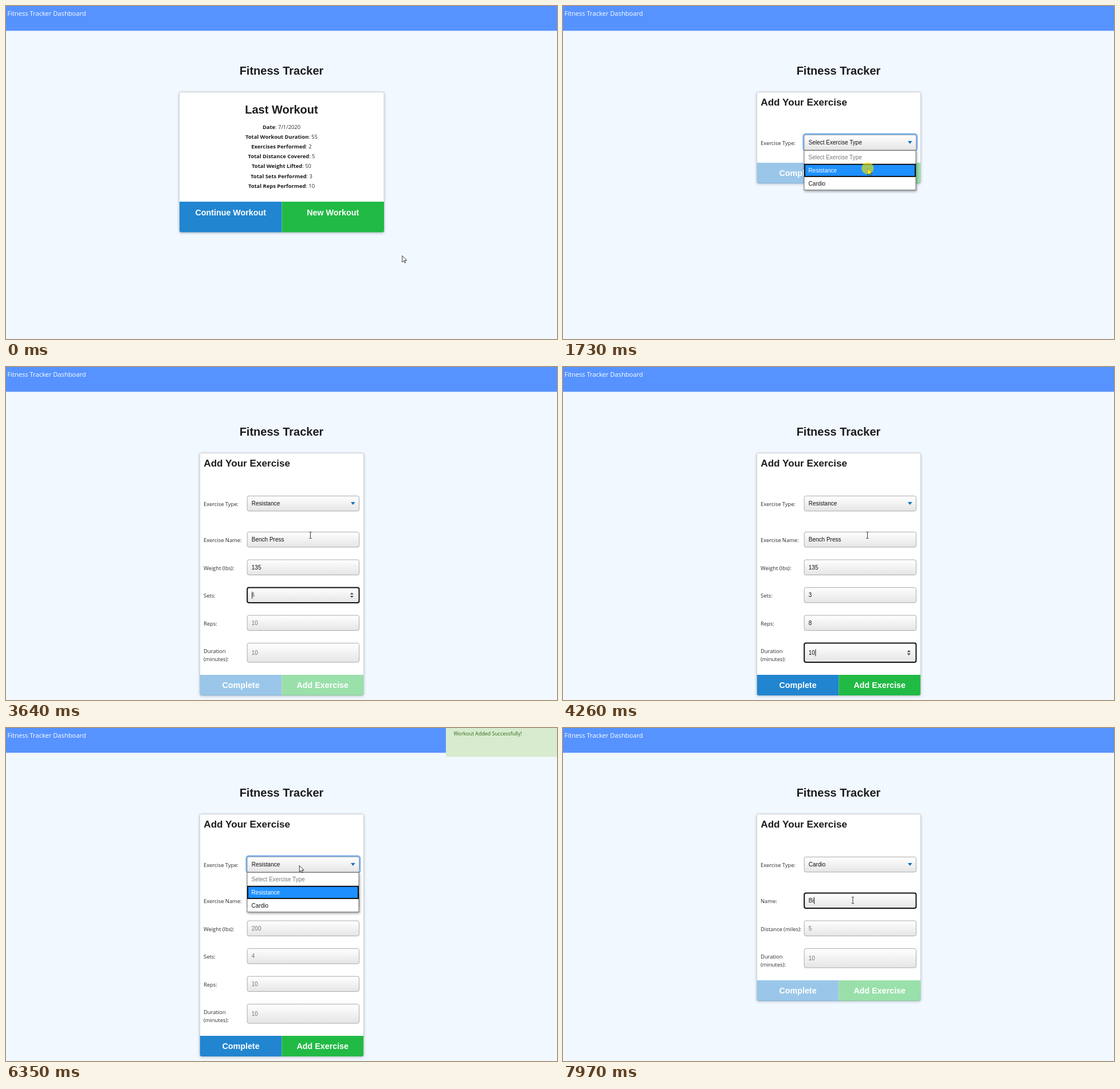
An HTML page for the animation above (8000 ms loop, 962 by 582 pixels).

```html
<!DOCTYPE html>
<html lang="en">
<head>
<meta charset="utf-8">
<title>Fitness Tracker</title>
<style>
  html, body { margin: 0; width: 100%; height: 100%; overflow: hidden; background: #f1f8ff; }
  svg { position: absolute; left: 0; top: 0; }
  text { font-family: "Open Sans", "Noto Sans", sans-serif; font-size: 9.4px; fill: #2b2b2b; }
  .b { font-weight: 700; fill: #1b1c1d; }
  .h { font-family: "Liberation Sans", Arial, sans-serif; font-weight: 700; fill: #1b1c1d; }
  .i { font-family: "Liberation Sans", Arial, sans-serif; font-size: 10px; fill: #111; }
  .ph { fill: #777; }
  .card { fill: #fff; stroke: #d0d2d6; filter: drop-shadow(0 1px 2px rgba(40, 50, 70, .3)); }
  .list { fill: #fff; stroke: #767676; filter: drop-shadow(1px 2px 2px rgba(0, 0, 0, .4)); }
</style>
</head>
<body>
<svg id="stage" width="962" height="582" viewBox="0 0 962 582">
  <defs>
    <linearGradient id="grad" x1="0" y1="0" x2="0" y2="1">
      <stop offset="0" stop-color="#fff"/><stop offset="1" stop-color="#e5e5e5"/>
    </linearGradient>
  </defs>
  <rect width="962" height="582" fill="#f1f8ff"/>
  <rect width="962" height="43.3" fill="#5793ff"/>
  <text x="2.4" y="16.5" style="font-size:11.15px;fill:#fff">Fitness Tracker Dashboard</text>
  <text class="h" x="481" y="120" text-anchor="middle" style="font-size:20px">Fitness Tracker</text>
  <g id="page"></g>
  <g id="toast">
    <rect width="214" height="50.3" fill="#d7ebce"/>
    <text x="13.6" y="13" style="font-size:8.9px;fill:#33691e">Workout Added Successfully!</text>
  </g>
  <g id="pointer"></g>
</svg>
<script>
const LOOP = 8000;
const BLUE = '#2185d0', GREEN = '#21ba45', GREEN_ON = '#0ea432';
const OPTIONS = ['Select Exercise Type', 'Resistance', 'Cardio'];
const $ = id => document.getElementById(id);
const pen = document.createElement('canvas').getContext('2d');
pen.font = '10px "Liberation Sans", Arial, sans-serif';

// [time, x, y] of the pointer
const PATH = [
  [70, 691.5, 436], [530, 530, 357], [850, 530, 357], [1260, 532, 241], [1420, 532, 241],
  [1650, 531.5, 283.5], [1830, 531.5, 283.5], [2080, 531.5, 294], [4260, 531.5, 294],
  [4790, 533, 552], [5030, 533, 552], [5660, 519, 219], [5750, 519, 219], [6080, 512, 240],
  [6440, 512, 240], [6750, 508, 304.5], [7080, 508, 304.5], [7400, 506, 301]
];
const CLICKS = [[690, 850], [1320, 1430], [1650, 1810], [2120, 2220], [4870, 5020],
  [6180, 6290], [6890, 7000], [7570, 7680]];
const FOCUS = [[0, ''], [1340, 'type'], [2150, 'name'], [3180, 'weight'], [3570, 'sets'],
  [3800, 'reps'], [4030, 'time'], [4870, 'add'], [6200, 'type'], [7600, 'name']];
const KIND = [[0, 0], [1800, 1], [6970, 2]];
const CLEARED = 5180;

const FORMS = [
  [],
  [['name', 'Exercise Name:', 'Bench Press'], ['weight', 'Weight (lbs):', '200'],
   ['sets', 'Sets:', '4'], ['reps', 'Reps:', '10'], ['time', 'Duration', '10']],
  [['name', 'Name:', 'Running'], ['miles', 'Distance (miles):', '5'], ['time', 'Duration', '10']]
];
// field: [first key time, text]
const TYPED = {
  name: [2305, 'Bench Press'], weight: [3255, '135'], sets: [3645, '3'],
  reps: [3875, '8'], time: [4105, '10']
};

const within = (t, a, b) => t >= a && t < b;
const latest = (rows, t) => rows.filter(r => r[0] <= t).pop()[1];
const ease = u => u * u * (3 - 2 * u);
const ramp = (t, a, b) => ease(Math.min(1, Math.max(0, (t - a) / (b - a))));
const keys = (t, [start, text]) => t < start ? '' : text.slice(0, Math.floor((t - start) / 78) + 1);
const isOpen = t => within(t, 1390, 1800) || within(t, 6270, 6970);

const text = (x, y, s, cls = '', extra = '') => `<text class="${cls}" x="${x}" y="${y}" ${extra}>${s}</text>`;
const rect = (x, y, w, h, extra) => `<rect x="${x}" y="${y}" width="${w}" height="${h}" ${extra}/>`;
const title = (x, y, s, size, extra = '') => text(x, y, s, 'h', `style="font-size:${size}px;${extra}"`);

function place(t) {
  const n = PATH.findIndex(p => p[0] > t);
  if (n === 0) return PATH[0].slice(1);
  if (n < 0) return PATH[PATH.length - 1].slice(1);
  const [a, x, y] = PATH[n - 1], [b, x2, y2] = PATH[n];
  const u = ramp(t, a, b);
  return [x + (x2 - x) * u, y + (y2 - y) * u];
}

function buttons(x, y, w, h, base, names, green, alpha) {
  const half = w / 2, r = 3;
  const label = (cx, s) => text(cx, base, s, 'h', 'text-anchor="middle" style="font-size:14.29px;fill:#fff"');
  return `<g opacity="${alpha}">
    <path d="M${x} ${y}h${half}v${h}h${r - half}q${-r} 0 ${-r} ${-r}z" fill="${BLUE}"/>
    <path d="M${x + half} ${y}h${half}v${h - r}q0 ${r} ${-r} ${r}h${r - half}z" fill="${green}"/></g>`
    + label(x + half / 2, names[0]) + label(x + half * 1.5, names[1]);
}

function summary(t) {
  const rows = [['Date', '7/1/2020'], ['Total Workout Duration', 55], ['Exercises Performed', 2],
    ['Total Distance Covered', 5], ['Total Weight Lifted', 50], ['Total Sets Performed', 3],
    ['Total Reps Performed', 10]];
  return rect(302.5, 150.5, 357.5, 245, 'rx="3" class="card"')
    + text(481, 188, 'Last Workout', 'h', 'text-anchor="middle" style="font-size:20px"')
    + rows.map(([k, v], i) => text(481, 214.8 + 17.15 * i,
        `<tspan class="b">${k}</tspan>: ${v}`, '', 'text-anchor="middle"')).join('')
    + buttons(303, 342, 357, 53.5, 365.7, ['Continue Workout', 'New Workout'],
        t < 690 ? GREEN : GREEN_ON, 1);
}

function box(y, h, focused) {
  const line = focused ? 'stroke="#111" stroke-width="2"' : 'stroke="#aaa"';
  return rect(421.2, y, 195.3, h, `rx="3" fill="url(#grad)" ${line}`);
}

function field(t, kind, [id, label, hint], y, focus) {
  const tall = id === 'time', h = tall ? 33.5 : 26.5, base = y + h / 2 + 3.5;
  let value = '';
  if (kind === 1 && t < CLEARED && TYPED[id]) value = keys(t, TYPED[id]);
  if (kind === 2 && id === 'name') value = keys(t, [7885, 'Bi']);
  const on = focus === id;
  let out = text(345, y + 17.6, label) + box(y, h, on);
  if (tall) out += text(345, y + 31.2, '(minutes):');
  out += text(428.8, base, value || hint, value ? 'i' : 'i ph');
  if (on) {
    const x = 429.3 + pen.measureText(value).width, m = y + h / 2;
    out += rect(x, m - 6, 1, 12, 'fill="#111"');
    if (id !== 'name') out += `<path d="M600.8 ${m - 1.2}l3-3.4 3 3.4zm0 2.4l3 3.4 3-3.4z" fill="#444"/>`;
  }
  return out;
}

function dropdown(kind, my) {
  let hot = Math.floor((my - 253) / 22.8);
  if (hot < 0 || hot > 2) hot = kind;
  return rect(421, 252.5, 195, 69, 'class="list"') + OPTIONS.map((s, i) => {
    const y = 253 + 22.8 * i;
    const mark = i === hot ? rect(422, y + .9, 193, 21.2, 'fill="#1e90ff" stroke="#000" stroke-width="1.8"') : '';
    const style = i === hot ? 'style="fill:#fff"' : '';
    return mark + text(428.6, y + 15, s, i ? 'i' : 'i ph', style);
  }).join('');
}

function workout(t, my) {
  const kind = latest(KIND, t), focus = latest(FOCUS, t), rows = FORMS[kind];
  const top = [274, 538, 441][kind];
  const ready = within(t, 4105, 6970);
  const lit = focus === 'add' || within(t, 4760, 4870);
  let out = rect(338.5, 150.5, 285.8, top - 114.8, 'rx="3" class="card"')
    + title(345.3, 174, 'Add Your Exercise', 17.14)
    + buttons(338.7, top, 285.4, 36, top + 23.2, ['Complete', 'Add Exercise'],
        lit ? GREEN_ON : GREEN, ready ? 1 : .45);
  out += text(345, 243, 'Exercise Type:');
  if (focus === 'type')
    out += rect(419.7, 223.9, 198.3, 29.4, 'rx="4" fill="none" stroke="#75adec" stroke-width="2.6"');
  out += box(225.4, 26.4, false) + text(428.8, 242.1, OPTIONS[kind], 'i')
    + '<path d="M602 236h7.6l-3.8 5z" fill="#0d72bf"/>';
  rows.forEach((row, i) => out += field(t, kind, row, 288.4 + 48.55 * i, focus));
  if (isOpen(t)) out += dropdown(kind, my);
  return out;
}

function pointer(t, x, y) {
  const pressed = CLICKS.some(c => within(t, ...c));
  const step = (y - 288) / 48.55;
  const overField = t > 850 && !isOpen(t) && x > 421 && x < 617 && step >= 0
    && step < FORMS[latest(KIND, t)].length && step % 1 < .56;
  const shape = overField
    ? '<path d="M-2.2-5.5h1.6l.6.6.6-.6h1.6M0-5V5M-2.2 5.5h1.6l.6-.6.6.6h1.6" fill="none" stroke="#333"/>'
    : `<path d="M.3.4V11.6L2.8 9.2 4.6 13 6.3 12.2 4.6 8.5H8.2Z" fill="${pressed ? '#ffff70' : '#fff'}" stroke="#222" stroke-width=".9"/>`;
  const spot = pressed ? '<circle cx=".4" cy="0" r="10.6" fill="#f4ea00" opacity=".6"/>' : '';
  return `<g transform="translate(${x.toFixed(2)} ${y.toFixed(2)})">${shape}${spot}</g>`;
}

const shown = {};
function put(id, html) {
  if (shown[id] !== html) $(id).innerHTML = shown[id] = html;
}

function draw(t) {
  const [x, y] = place(t);
  put('page', t < 850 ? summary(t) : workout(t, y));
  put('pointer', pointer(t, x, y));
  const slide = ramp(t, 5200, 5650) - ramp(t, 6250, 6750);
  $('toast').setAttribute('transform', `translate(${962 - 217 * slide} 0)`);
}

const start = performance.now();
function tick() {
  draw((performance.now() - start) % LOOP);
  requestAnimationFrame(tick);
}
tick();
</script>
</body>
</html>
```
